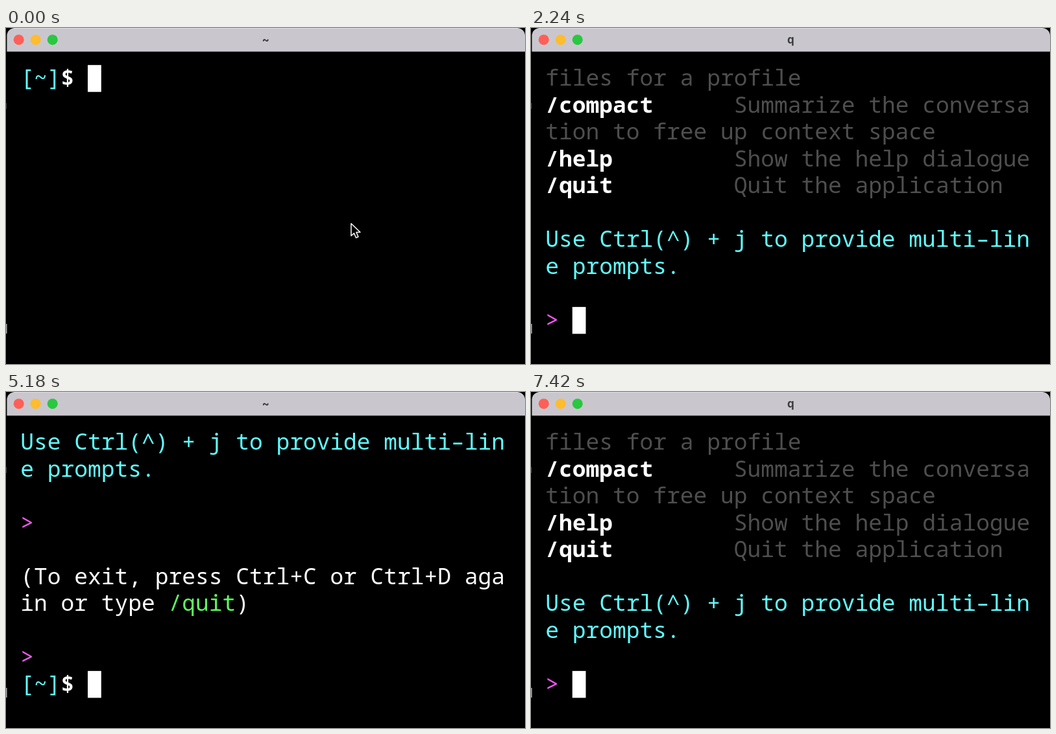
These frames come from a looping animation (800x519 px, 8000 ms). An HTML page with a canvas:

```html
<!DOCTYPE html>
<html lang="en">
<head>
<meta charset="utf-8">
<title>Terminal</title>
<style>
  html, body { margin: 0; width: 100%; height: 100%; overflow: hidden; background: #000; }
  canvas { display: block; width: 800px; height: 519px; }
</style>
</head>
<body>
<canvas id="stage" width="800" height="519"></canvas>
<script>
const ctx = document.getElementById('stage').getContext('2d');
const LOOP = 8000;
const ORIGIN = { x: 22.2, y: 57.2 };
const CELL = { w: 20.76, h: 41.52 };
const BASELINE = 31.8;
const FONT = '34.6px "Noto Sans Mono", "DejaVu Sans Mono", monospace';

const STYLES = {
  plain: { color: '#fff', weight: 400 },
  bold: { color: '#fff', weight: 700 },
  dim: { color: '#4e4e4e', weight: 400 },
  cyan: { color: '#60fdff', weight: 400 },
  pink: { color: '#f957f9', weight: 400 },
  green: { color: '#5ffa60', weight: 400 }
};

// A line is a list of [style, text] runs.
const line = (style, text) => [[style, text]];
const blank = [];
const entry = (name, about) => [['bold', name.padEnd(14)], ['dim', about]];
const shell = (typed = '') => [['cyan', '[~]'], ['bold', '$'], ['plain', ' ' + typed]];
const chat = line('pink', '>');

const hint = [
  line('cyan', 'Use Ctrl(^) + j to provide multi–lin'),
  line('cyan', 'e prompts.'),
  blank,
  chat
];
const help = [
  line('dim', 'files for a profile'),
  entry('/compact', 'Summarize the conversa'),
  line('dim', 'tion to free up context space'),
  entry('/help', 'Show the help dialogue'),
  entry('/quit', 'Quit the application'),
  blank,
  ...hint
];
const exitNote = [
  ...hint,
  blank,
  line('plain', '(To exit, press Ctrl+C or Ctrl+D aga'),
  [['plain', 'in or type '], ['green', '/quit'], ['plain', ')']],
  blank,
  chat
];

// Each state holds from its start time until the next one.
const state = (at, title, lines, col, row) => ({ at, title, lines, col, row });
const states = [
  state(0, '~', [shell()], 5, 0),
  state(840, '~', [shell('q')], 6, 0),
  state(910, '~', [shell('q ')], 7, 0),
  state(1470, '~', [shell('q')], 6, 0),
  state(1750, 'q', [shell('q')], 0, 1),
  state(2030, 'q', help, 2, 9),
  state(4340, 'q', [blank, ...exitNote], 2, 9),
  state(4830, 'q', exitNote, 0, 9),
  state(4900, '~', [...exitNote, shell()], 5, 9),
  state(5950, '~', [shell()], 5, 0),
  state(6300, '~', [shell('q')], 6, 0),
  state(6860, 'q', [shell('q')], 0, 1),
  state(7140, 'q', help, 2, 9)
];
const POINTER_HIDES = 630;

function drawWindow(title) {
  ctx.fillStyle = '#000';
  ctx.fillRect(0, 0, 800, 519);

  // Slivers of whatever lies behind the window.
  ctx.fillStyle = '#444';
  ctx.fillRect(0, 116, 1, 9);
  ctx.fillStyle = '#aaa';
  ctx.fillRect(0, 457, 1.5, 15);

  ctx.fillStyle = '#c9c7cd';
  ctx.beginPath();
  ctx.roundRect(1.4, 0, 798.6, 36.6, [12, 12, 0, 0]);
  ctx.fill();
  ctx.fillStyle = '#dddce0';
  ctx.fillRect(12, 0, 777, 1);

  ['#ff5f57', '#febc2e', '#28c840'].forEach((color, i) => {
    ctx.fillStyle = color;
    ctx.beginPath();
    ctx.arc(19.7 + 26 * i, 18.2, 8, 0, Math.PI * 2);
    ctx.fill();
  });

  ctx.font = '700 17px Inter, sans-serif';
  ctx.textAlign = 'center';
  ctx.fillStyle = '#3c3b3e';
  ctx.fillText(title, 400.3, 23.5);
}

function drawLine(runs, row) {
  let col = 0;
  ctx.textAlign = 'left';
  for (const [name, text] of runs) {
    const { color, weight } = STYLES[name];
    ctx.font = `${weight} ${FONT}`;
    ctx.fillStyle = color;
    ctx.fillText(text, ORIGIN.x + col * CELL.w, ORIGIN.y + row * CELL.h + BASELINE);
    col += text.length;
  }
}

function drawCursor(col, row) {
  ctx.fillStyle = '#fff';
  ctx.fillRect(ORIGIN.x + col * CELL.w, ORIGIN.y + row * CELL.h, CELL.w, CELL.h);
}

function drawPointer() {
  ctx.beginPath();
  ctx.moveTo(532, 302);
  for (const [x, y] of [[532, 321], [536.5, 317], [539.5, 324], [543, 322.5], [540, 315.5], [546, 315.5]]) {
    ctx.lineTo(x, y);
  }
  ctx.closePath();
  ctx.fillStyle = '#000';
  ctx.fill();
  ctx.strokeStyle = '#fff';
  ctx.lineWidth = 1.5;
  ctx.lineJoin = 'round';
  ctx.stroke();
}

function render(now) {
  const t = now % LOOP;
  const current = states.findLast(s => s.at <= t);
  drawWindow(current.title);
  current.lines.forEach(drawLine);
  drawCursor(current.col, current.row);
  if (t < POINTER_HIDES) drawPointer();
}

const start = performance.now();
function tick() {
  render(performance.now() - start);
  requestAnimationFrame(tick);
}
tick();
</script>
</body>
</html>
```
